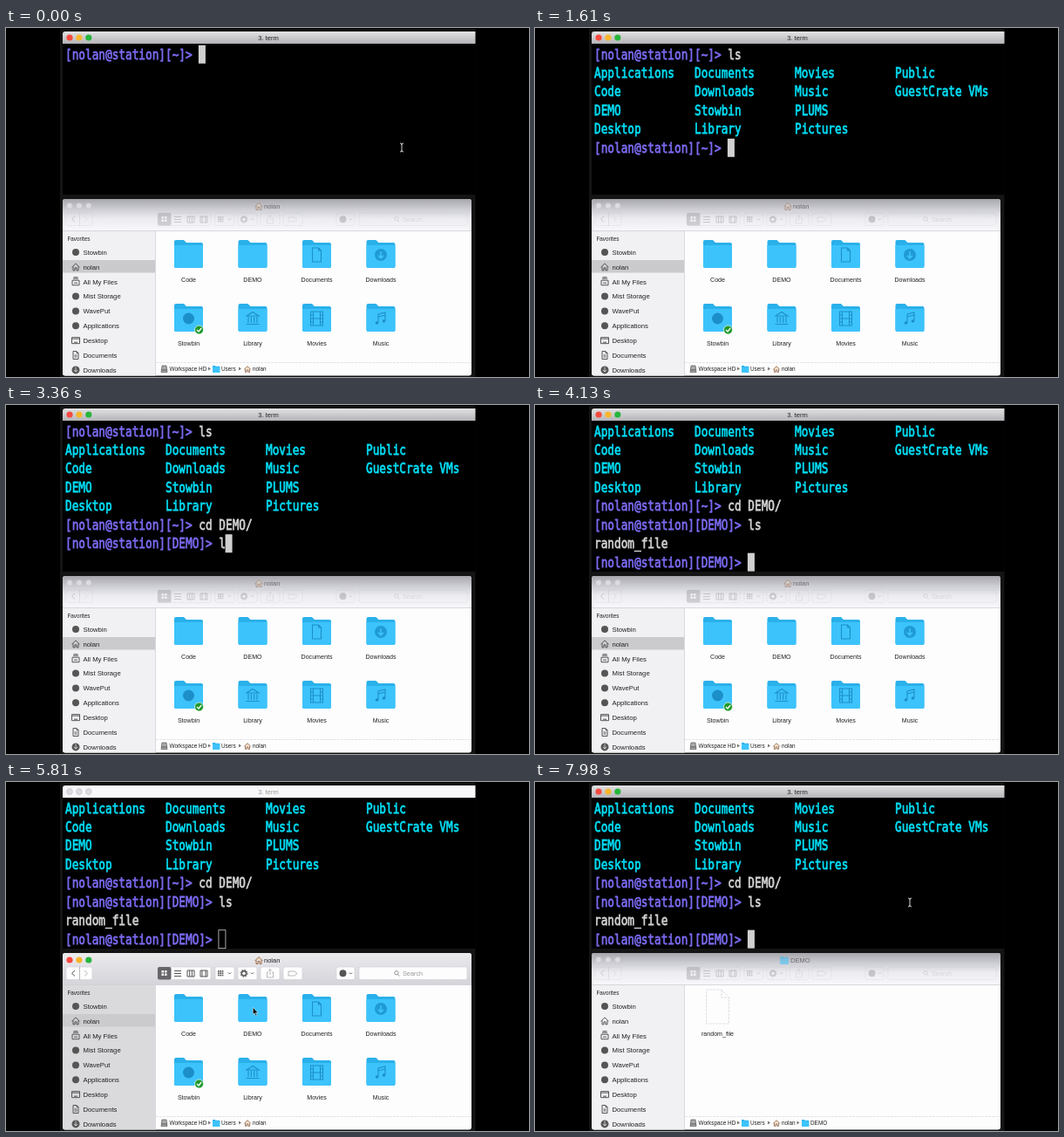
An HTML page for the animation above (8 s loop, 600x400 px).

```html
<!DOCTYPE html>
<html lang="en">
<head>
<meta charset="utf-8">
<title>Terminal and file browser</title>
<style>
  html, body { margin: 0; width: 100%; height: 100%; overflow: hidden; background: #000; }
  svg { display: block; width: 100vw; height: 100vh; }
  text { font-family: "Liberation Sans", Arial, sans-serif; fill: #222; white-space: pre; }
  #rows text { font: 12.74px "DejaVu Sans Mono", monospace; stroke-width: .6; }
  #rows .prompt { fill: #7b6bf2; stroke: #7b6bf2; }
  #rows .list { fill: #00def6; stroke: #00def6; }
  #rows .plain { fill: #d2d2d2; stroke: #d2d2d2; }
  .side { font-size: 7.7px; }
  .label { font-size: 7.1px; text-anchor: middle; }
  .path { font-size: 6.4px; }
  .line { fill: none; stroke: #555; stroke-width: 1; }
  .ink { fill: none; stroke: #1c8fc8; stroke-width: 1.1; }
  .button { fill: #fdfdfd; stroke: #cfcfd3; stroke-width: .6; }
  .demo .home-view, svg:not(.demo) .demo-view,
  svg:not(.front) .front-only, .front .back-only { display: none; }
  svg:not(.front) .tools { opacity: .25; }
  svg:not(.front) .button { fill: none; stroke: #8c8c92; stroke-dasharray: 2 1; }
  svg:not(.front) .heading { opacity: .55; }
  .front .heading-term { opacity: .45; }
  #caret { fill: #d0d0d0; }
  .front #caret { fill: none; stroke: #a8a8a8; stroke-width: 1; }
</style>
</head>
<body>
<svg id="stage" viewBox="0 0 600 400" xmlns="http://www.w3.org/2000/svg">
  <defs>
    <linearGradient id="termBar" x2="0" y2="1">
      <stop stop-color="#e2e2e4"/><stop offset="1" stop-color="#b4b4b8"/>
    </linearGradient>
    <linearGradient id="barBack" x2="0" y2="1">
      <stop stop-color="#a6a6ac"/><stop offset=".3" stop-color="#cbcbd2"/>
      <stop offset=".62" stop-color="#ececf1"/><stop offset="1" stop-color="#f8f8fb"/>
    </linearGradient>
    <linearGradient id="barFront" x2="0" y2="1">
      <stop stop-color="#ebebee"/><stop offset="1" stop-color="#d4d4da"/>
    </linearGradient>
    <clipPath id="window"><rect x="65" y="196" width="469" height="202.500" rx="3"/></clipPath>
    <g id="folder">
      <path d="M0 2Q0 0 2 0H11L14 3H31Q33 3 33 5V30Q33 32 31 32H2Q0 32 0 30Z" fill="#2ab0ea"/>
      <path d="M0 6H33V30Q33 32 31 32H2Q0 32 0 30Z" fill="#3dc3fb"/>
    </g>
    <path id="house" d="M-4.500 .5L0-4L4.500 .5M-3-.5V4H-1V1H1V4H3V-.5"/>
    <path id="sheet" d="M-3-4.500H1L3-2.500V4.500H-3ZM1-4.500V-2.500H3"/>
    <path id="arrow" d="M0-4.500V3M-3 0L0 3L3 0"/>
  </defs>

  <rect width="600" height="400"/>
  <rect x="62" y="1" width="476.500" height="399" fill="#141414"/>
  <rect x="65" y="17" width="473.500" height="174"/>

  <path class="back-only" d="M65 18V7Q65 4 68 4H538.500V18Z" fill="url(#termBar)"/>
  <path class="front-only" d="M65 18V7Q65 4 68 4H538.500V18Z" fill="#f8f8fa"/>
  <g id="termLights"></g>
  <text class="heading-term" x="301" y="14" font-size="7.600" text-anchor="middle">3. term</text>
  <g id="rows"></g>
  <rect id="caret" width="8" height="21"/>

  <g clip-path="url(#window)">
    <rect x="65" y="196" width="469" height="203" fill="#fdfdfe"/>
    <rect class="back-only" x="65" y="232" width="106" height="168" fill="#f1f1f4"/>
    <rect class="front-only" x="65" y="232" width="106" height="168" fill="#dadadd"/>
    <rect class="home-view" x="65" y="266" width="106" height="14.500" fill="#cbcbce"/>
    <rect class="back-only" x="65" y="196" width="469" height="36.500" fill="url(#barBack)"/>
    <rect class="front-only" x="65" y="196" width="469" height="36.500" fill="url(#barFront)"/>
    <path d="M65 232.500H534M171.500 232.500V400" stroke="#d0d0d6" stroke-width=".8"/>
    <path d="M172 383.500H534" stroke="#dedee4" stroke-width=".8" stroke-dasharray="3 1"/>
    <g id="fileLights"></g>

    <g class="heading home-view">
      <use href="#house" x="290" y="204.500" fill="#efd8b8" stroke="#96705a"/>
      <text x="296" y="207" font-size="7.500">nolan</text>
    </g>
    <g class="heading demo-view">
      <use href="#folder" transform="translate(281.500 200)scale(.28)"/>
      <text x="293" y="207" font-size="7.500">DEMO</text>
    </g>

    <g class="tools" id="tools"></g>
    <text x="70.500" y="244" font-size="6.300" fill="#555">Favorites</text>
    <g id="sidebar"></g>
    <g class="home-view" id="folders"></g>
    <g class="demo-view">
      <path d="M196.500 238H214L222.500 247V277H196.500ZM214 238V247H222.500" fill="#fdfdfe" stroke="#dcdce0" stroke-width=".9" stroke-dasharray="3 1"/>
      <text class="label" x="209.500" y="291">random_file</text>
    </g>
    <g id="trail"></g>
  </g>

  <g id="pointer">
    <path id="beam" d="M-2-5Q0-5 0-3Q0-5 2-5M0-3V3M-2 5Q0 5 0 3Q0 5 2 5" fill="none" stroke="#d4d4d4"/>
    <path id="mouse" d="M0-4V6L2.300 4L4 8L5.500 7.300L3.900 3.500H7Z" fill="#000" stroke="#fff" stroke-width=".6" transform="translate(0 -.6)scale(.8)"/>
  </g>
</svg>

<script>
const byId = id => document.getElementById(id);
const stage = byId('stage');
const LOOP = 8000, CELL = 7.67, LEFT = 68, ROW = 21.42;

// Static furniture
const circle = (x, y, r, attrs) => `<circle cx="${x}" cy="${y}" r="${r}" ${attrs}/>`;
const text = (cls, x, y, s) => `<text class="${cls}" x="${x}" y="${y}">${s}</text>`;
const lights = (y, lit, dim) => ['#f8493f', '#f8b62c', '#27b53c'].map((c, i) => {
  const x = 73 + i * 10.9;
  return circle(x, y, 3.6, `class="${lit}" fill="${c}"`) +
    circle(x, y, 3.4, `class="${dim}" fill="#dcdce0" stroke="#bcbcc2" stroke-width=".6"`);
}).join('');
byId('termLights').innerHTML = lights(11, 'back-only', 'front-only');
byId('fileLights').innerHTML = lights(204, 'front-only', 'back-only');

const button = (x, w) => `<rect class="button" x="${x}" y="212" width="${w}" height="14.5" rx="2"/>`;
const grid = (x, n, color) => Array.from({length: n * n}, (_, i) =>
  `<rect x="${x + i % n * 7 / n}" y="${216 + Math.floor(i / n) * 7 / n}" width="${5 / n}" height="${5 / n}" fill="${color}"/>`).join('');
const chevron = x => `<path class="line" d="M${x} 218.500l1.500 1.500l1.500-1.500"/>`;
byId('tools').innerHTML =
  [[69, 30], [174, 61], [240, 22], [266, 22], [292, 22], [318, 22], [379, 21], [405, 124]].map(b => button(...b)).join('') +
  '<rect x="174" y="212" width="15.500" height="14.500" rx="2" fill="#66666a"/>' +
  grid(178.5, 2, '#fff') + grid(243, 3, '#555') +
  `<path class="line" d="M79 216L75.500 219.300L79 222.500M193 216.500h8m-8 3h8m-8 3h8M208 216h8v7h-8zm2.700 0v7m2.700-7v7M223 216h8v7h-8zm2 0v7m4-7v7"/>
   <path class="line" d="M90 216L93.500 219.300L90 222.500M84.500 212V226.500M301 218h-1.500v6h7v-6h-1.500M303 221v-6.500m-1.800 1.800l1.800-1.800l1.800 1.800M324 217h7l3 2.500l-3 2.500h-7z" stroke-opacity=".4"/>` +
  circle(273, 219.3, 2.7, 'class="line" style="stroke-width:1.6"') +
  circle(273, 219.3, 4.1, 'class="line" stroke-dasharray="1.6 1.6"') +
  circle(386.5, 219.3, 4, 'fill="#555"') +
  chevron(255) + chevron(281) + chevron(394) +
  circle(448, 218.7, 2.2, 'class="line" stroke-opacity=".6"') +
  '<path class="line" d="M449.500 220.500l2 2" stroke-opacity=".6"/>' +
  '<text x="455" y="222" font-size="7.300" fill-opacity=".45">Search</text>';

const use = id => `<use href="#${id}" class="line"/>`;
const dot = circle(0, 0, 4, 'fill="#555"');
const path = d => `<path class="line" d="${d}"/>`;
const places = [
  ['Stowbin', dot],
  ['nolan', use('house')],
  ['All My Files', path('M-4-1.500H4V4H-4ZM-3-3.500H3M-2.500-5H2.500M-2 1.500H2')],
  ['Mist Storage', dot],
  ['WavePut', dot],
  ['Applications', dot],
  ['Desktop', path('M-4.500-3.500H4.500V3.500H-4.500ZM-4.500-2H4.500M-2 2H2')],
  ['Documents', use('sheet') + path('M-1.500 0H1.500M-1.500 2H1.500')],
  ['Downloads', circle(0, 0, 4.5, 'fill="#555"') + '<use href="#arrow" fill="none" stroke="#f1f1f4" transform="scale(.75)"/>']
];
byId('sidebar').innerHTML = places.map(([name, icon], i) => {
  const y = 257 + i * 16.86;
  return `<g transform="translate(80 ${y})">${icon}</g>` + text('side', 88.5, y + 2.8, name);
}).join('');

const ink = d => `<path class="ink" d="${d}"/>`;
const folders = [
  ['Code', ''], ['DEMO', ''],
  ['Documents', ink('M-5-8H2L5-5V8H-5ZM2-8V-5H5')],
  ['Downloads', circle(0, 0, 7, 'fill="#1f9ad4"') + '<use href="#arrow" y=".8" fill="none" stroke="#3dc3fb" stroke-width="1.600"/>'],
  ['Stowbin', circle(0, 0, 6.5, 'fill="#1c8fc8"')],
  ['Library', ink('M-7-3L0-7.500L7-3ZM-5-2V5M-1.700-2V5M1.700-2V5M5-2V5M-7.500 6.500H7.500')],
  ['Movies', ink('M-7-8H7V8H-7ZM-4-8V8M4-8V8M-4 0H4M-7-4H-4M-7 0H-4M-7 4H-4M4-4H7M4 0H7M4 4H7')],
  ['Music', ink('M-3 5V-5L5-7V3M-3-2L5-4') + circle(-4.5, 5, 1.8, 'fill="#1c8fc8"') + circle(3.5, 3, 1.8, 'fill="#1c8fc8"')]
];
byId('folders').innerHTML = folders.map(([name, icon], i) => {
  const x = 209.5 + i % 4 * 73.5, y = i < 4 ? 243 : 316;
  return `<use href="#folder" x="${x - 16.5}" y="${y}"/>` +
    `<g transform="translate(${x} ${y + 17})">${icon}</g>` + text('label', x, y + 47.5, name);
}).join('') + circle(221.5, 346, 5, 'fill="#1f9a2c" stroke="#fff" stroke-width=".7"') +
  '<path d="M219 346l2 2l3.200-4" fill="none" stroke="#fff" stroke-width="1.300"/>';

const sep = x => `<path d="M${x} 388.500l3 2l-3 2z" fill="#777"/>`;
const smallFolder = x => `<use href="#folder" transform="translate(${x} 387)scale(.25)"/>`;
byId('trail').innerHTML =
  '<path d="M179 387H184L185 394.500H178Z" fill="#aaa" stroke="#555" stroke-width=".7"/><path class="line" d="M178.500 392H184.500"/>' +
  text('path', 187.5, 393, 'Workspace HD') + sep(232) + smallFolder(237) +
  text('path', 247, 393, 'Users') + sep(267) +
  '<use href="#house" transform="translate(277 391)scale(.85)" fill="#efd8b8" stroke="#96705a"/>' +
  text('path', 283, 393, 'nolan') +
  `<g class="demo-view">${sep(300.5)}${smallFolder(306)}${text('path', 316, 393, 'DEMO')}</g>`;

// Terminal session
const keys = [
  [700, 'l'], [840, 's'], [1330, '\n'],
  [1890, 'c'], [2030, 'd'], [2170, ' '], [2380, 'D'], [2730, 'EMO/'], [3010, '\n'],
  [3360, 'l'], [3500, 's'], [3780, '\n']
];
const listing = [
  ['Applications', 'Documents', 'Movies', 'Public'],
  ['Code', 'Downloads', 'Music', 'GuestCrate VMs'],
  ['DEMO', 'Stowbin', 'PLUMS'],
  ['Desktop', 'Library', 'Pictures']
].map(row => ({out: row.map(s => s.padEnd(15)).join('').trimEnd(), cls: 'list'}));

function session(count) {
  const lines = [];
  let dir = '~', input = '';
  const prompt = () => ({prompt: `[nolan@station][${dir}]> `, out: input, cls: 'plain'});
  for (const [, key] of keys.slice(0, count)) {
    if (key !== '\n') { input += key; continue; }
    lines.push(prompt());
    if (input.startsWith('cd')) dir = 'DEMO';
    else if (dir === '~') lines.push(...listing);
    else lines.push({out: 'random_file', cls: 'plain'});
    input = '';
  }
  return [...lines, prompt()].slice(-8);
}

function drawTerminal(count) {
  const lines = session(count);
  byId('rows').innerHTML = lines.map(({prompt = '', out, cls}, i) =>
    `<text transform="translate(${LEFT} ${35.6 + i * ROW})scale(1 1.28)"><tspan class="prompt">${prompt.replace('>', '&gt;')}</tspan><tspan class="${cls}">${out}</tspan></text>`).join('');
  const last = lines[lines.length - 1];
  byId('caret').setAttribute('x', LEFT + (last.prompt + last.out).length * CELL - .5);
  byId('caret').setAttribute('y', 19.7 + (lines.length - 1) * ROW);
}

// Pointer route: time, x, y
const route = [
  [0, 454, 137], [4480, 454, 137], [5110, 393, 205], [5600, 284, 262],
  [6300, 281, 263], [6720, 277, 265], [6860, 277, 265], [7420, 430, 138], [LOOP, 430, 138]
];
function pointerAt(t) {
  const i = route.findIndex(p => p[0] > t);
  const [t0, x0, y0] = route[i - 1], [t1, x1, y1] = route[i];
  const k = (t - t0) / (t1 - t0), e = k * k * (3 - 2 * k);
  return [x0 + (x1 - x0) * e, y0 + (y1 - y0) * e];
}

let typed = -1;
function draw(now) {
  const t = now % LOOP;
  const count = keys.filter(k => k[0] <= t).length;
  if (count !== typed) drawTerminal(typed = count);
  stage.classList.toggle('front', t >= 5670 && t < 7490);
  stage.classList.toggle('demo', t >= 6300);
  const [x, y] = pointerAt(t), overText = y < 192;
  byId('pointer').setAttribute('transform', `translate(${x} ${y})`);
  byId('pointer').style.display = t >= 700 && t < 4410 ? 'none' : '';
  byId('beam').style.display = overText ? '' : 'none';
  byId('mouse').style.display = overText ? 'none' : '';
}
const start = performance.now();
function tick() {
  draw(performance.now() - start);
  requestAnimationFrame(tick);
}
tick();
</script>
</body>
</html>
```
